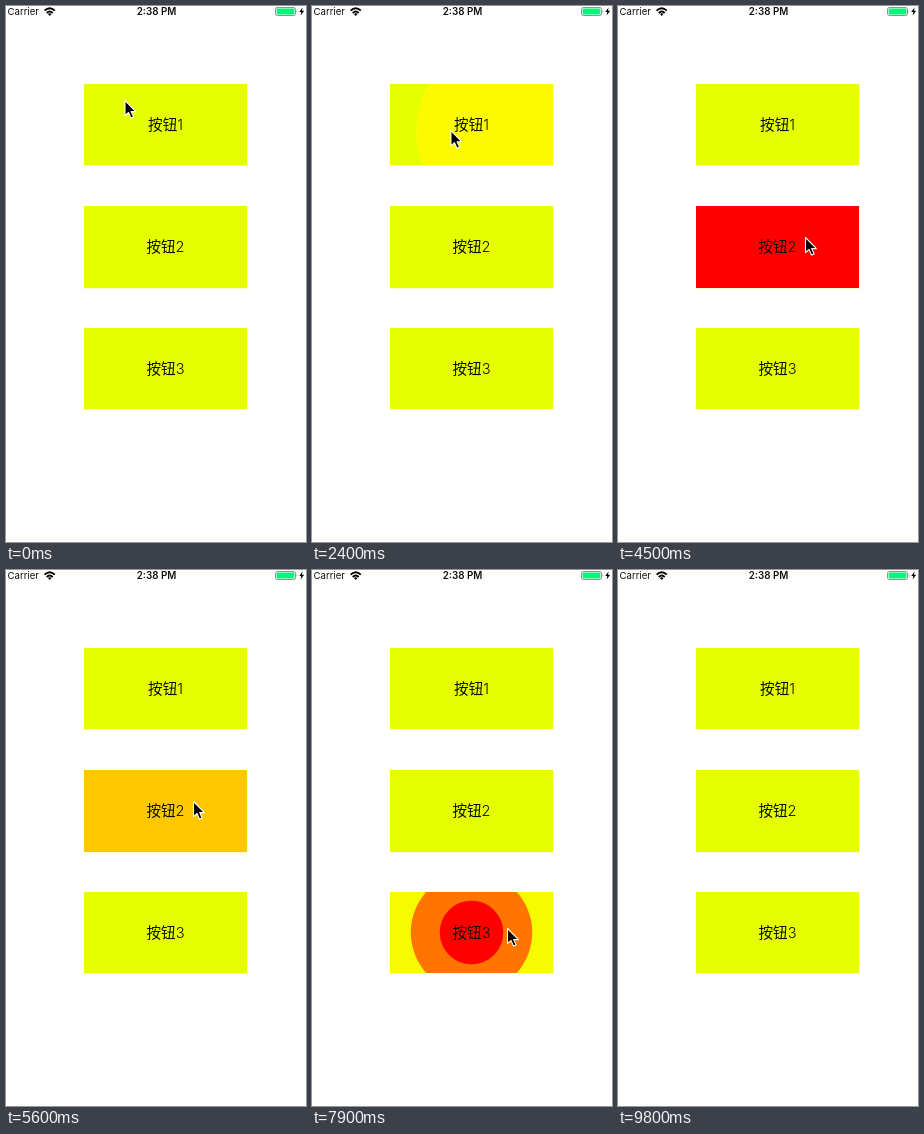
An HTML page with a canvas for the animation above (10000 ms loop, 300 by 536 pixels).

```html
<!DOCTYPE html>
<html lang="zh">
<head>
<meta charset="utf-8">
<title>Ripple buttons</title>
<style>
  html, body { margin: 0; width: 100%; height: 100%; overflow: hidden; background: #fff; }
  #stage { position: relative; width: 300px; height: 536px; overflow: hidden; }
  #stage > * { position: absolute; }
  canvas, svg { left: 0; top: 0; }
  .bar { top: 0; height: 11px; line-height: 11px; white-space: nowrap; color: #111;
         font-family: Inter, "Liberation Sans", sans-serif; }
  .carrier { left: 1.5px; font-size: 9.6px; }
  .clock { left: 100px; width: 101px; text-align: center; font-size: 9.8px; font-weight: 600; }
  .label { left: 78px; width: 163px; height: 22px; line-height: 22px; text-align: center;
           font-size: 14.6px; font-weight: 300; color: #081000;
           font-family: Inter, "Noto Sans CJK SC", "Noto Sans CJK", sans-serif; }
</style>
</head>
<body>
<div id="stage">
  <canvas id="ripples" width="300" height="536"></canvas>
  <div class="bar carrier">Carrier</div>
  <div class="bar clock">2:38 PM</div>
  <div class="label" style="top:108px">按钮1</div>
  <div class="label" style="top:230px">按钮2</div>
  <div class="label" style="top:352px">按钮3</div>
  <svg width="300" height="536">
    <g fill="none" stroke="#000" stroke-width="1.9">
      <path d="M38.6 4.6Q43.7 -.2 48.8 4.6"/>
      <path d="M40.7 7Q43.7 4.2 46.7 7"/>
    </g>
    <path d="M43.7 9.9L41.9 8Q43.7 6.5 45.5 8Z"/>
    <rect x="269.5" y="1.5" width="20" height="8" rx="1.8" fill="#fff" stroke="#777" stroke-width=".8"/>
    <rect x="270.6" y="2.6" width="17.8" height="5.8" rx=".8" fill="#08f57c"/>
    <path d="M290.6 4Q292 5.5 290.6 7Z" fill="#777"/>
    <path d="M296.6 1.5L293.2 6H295.3L294.6 9.6L298.2 4.8H296Z"/>
    <path id="cursor" d="M0 0V15.2L3.5 12L6 17.6L8.6 16.5L6.2 11.1H10.9Z"
          stroke="#fff" stroke-width="1.1" stroke-linejoin="round"/>
  </svg>
</div>
<script>
const LOOP = 10000, STEP = 100;
const LEFT = 78, WIDTH = 163;
const FADE_START = 0.2, LIFE = 0.63;
const ctx = document.getElementById('ripples').getContext('2d');
const cursor = document.getElementById('cursor');

// A run of taps: first time, interval, count, centre.
const taps = (start, gap, count, x, y) =>
  Array.from({ length: count }, (_, i) => ({ at: start + gap * i, x, y }));

const buttons = [
  { top: 78, height: 81, speed: 165, taps: [
    ...taps(200, 200, 4, 108, 103),
    ...taps(1224, 195, 4, 202, 125),
    ...taps(2861, 136, 3, 110.5, 126) ] },
  { top: 200, height: 82, speed: Infinity, taps: [
    ...taps(4500, 200, 4),
    ...taps(5640, 170, 4) ] },
  { top: 322, height: 81, speed: 150, taps: taps(6916, 193, 11, 159.5, 362.5) }
];

// Pointer tip: time, x, y.
const route = [
  [0, 119, 94.5], [200, 108, 102], [800, 108, 102], [1200, 201.5, 124], [1900, 201.5, 124],
  [2700, 110, 125], [3200, 110, 125], [3400, 127.5, 132], [4300, 187.5, 231.5],
  [6300, 187.5, 231.5], [6800, 195.5, 358.5], [9500, 195.5, 358.5]
];

const smooth = x => {
  const p = Math.min(1, Math.max(0, x));
  return p * p * (3 - 2 * p);
};

function drawRipple({ at, x, y }, { top, height, speed }, time) {
  const age = (time - at) / 1000;
  if (age < 0 || age >= LIFE) return;
  const alpha = 1 - smooth((age - FADE_START) / (LIFE - FADE_START));
  ctx.beginPath();
  if (speed === Infinity) ctx.rect(LEFT, top, WIDTH, height);
  else ctx.arc(x, y, speed * age, 0, Math.PI * 2);
  // Even a faint tint brings the red channel close to full.
  ctx.globalCompositeOperation = 'lighter';
  ctx.fillStyle = `rgb(${Math.round(Math.min(25, 1000 * alpha))},0,0)`;
  ctx.fill();
  ctx.globalCompositeOperation = 'source-over';
  ctx.fillStyle = `rgba(255,0,0,${alpha})`;
  ctx.fill();
}

function drawButton(button, time) {
  const { top, height } = button;
  // Soft right and bottom edge.
  ctx.fillStyle = '#f9ffcc';
  ctx.fillRect(LEFT, top, WIDTH + 1, height + 1);
  ctx.save();
  ctx.beginPath();
  ctx.rect(LEFT, top, WIDTH, height);
  ctx.clip();
  ctx.fillStyle = '#e6ff00';
  ctx.fillRect(LEFT, top, WIDTH, height);
  button.taps.forEach(tap => drawRipple(tap, button, time));
  ctx.restore();
}

function moveCursor(time) {
  const next = route.findIndex(([at]) => at > time);
  cursor.style.display = next < 0 ? 'none' : '';
  if (next < 0) return;
  const [t0, x0, y0] = route[next - 1], [t1, x1, y1] = route[next];
  const p = smooth((time - t0) / (t1 - t0));
  cursor.setAttribute('transform', `translate(${x0 + (x1 - x0) * p} ${y0 + (y1 - y0) * p})`);
}

const origin = performance.now();
function render() {
  const elapsed = (performance.now() - origin) % LOOP;
  const time = Math.floor(elapsed / STEP) * STEP;
  ctx.clearRect(0, 0, 300, 536);
  buttons.forEach(button => drawButton(button, time));
  moveCursor(time);
  requestAnimationFrame(render);
}
render();
</script>
</body>
</html>
```
